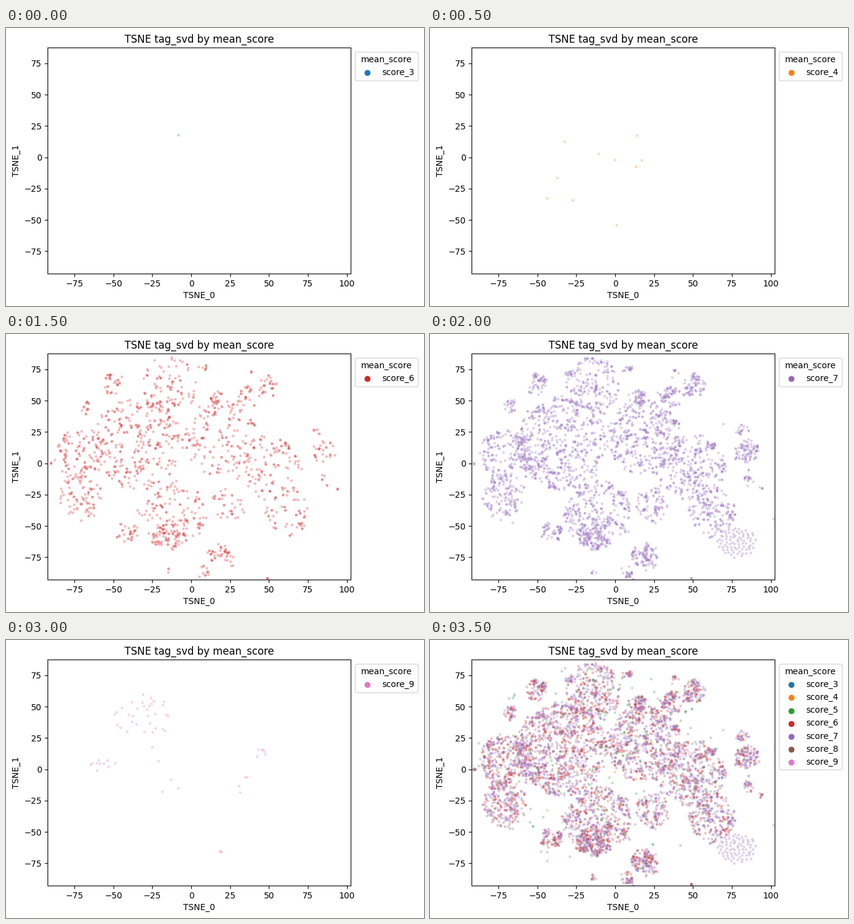
A matplotlib script that plays this animation: 684 by 455 pixels, repeating every 4500 ms.

```python
import matplotlib.pyplot as plt
import numpy as np
from matplotlib.animation import FuncAnimation

WIDTH, HEIGHT, DPI = 684, 455, 100
LEFT, BOTTOM, AX_W, AX_H = 68.4, 52.95, 496, 369.6
ORIGIN = np.array([303.05, 211.6])     # stage position of data (0, 0)
SCALE = np.array([2.546, -2.049])      # stage pixels per data unit
COLORS = ["#1f77b4", "#ff7f0e", "#2ca02c", "#d62728",
          "#9467bd", "#8c564b", "#e377c2"]
LABELS = [f"score_{n}" for n in range(3, 10)]

# Discs that outline the point cloud: x, y, radius
BODY = [(265, 83, 46), (215, 180, 75), (124, 195, 42), (122, 268, 38),
        (275, 295, 54), (350, 170, 62), (430, 220, 54), (463, 292, 38),
        (365, 280, 28)]
ISLANDS = [(174, 83, 17), (130, 120, 11), (338, 103, 15), (322, 57, 9),
           (398, 66, 6), (398, 103, 18), (432, 84, 19), (513, 157, 9),
           (519, 192, 20), (521, 240, 9), (542, 254, 4), (74, 211, 3),
           (200, 324, 17), (268, 328, 26), (322, 388, 11), (268, 388, 5),
           (352, 364, 23), (428, 399.5, 0.5)]


def disc(rng, x, y, rx, ry, n, spread=0.5):
    """Random points in an ellipse; spread 0.5 covers it evenly."""
    radius = rng.random(n) ** spread
    angle = rng.random(n) * 2 * np.pi
    return np.c_[x + rx * radius * np.cos(angle),
                 y + ry * radius * np.sin(angle)]


def with_doubles(rng, points, share):
    """Move some points almost onto a neighbour, which darkens it."""
    doubled = rng.random(len(points)) < share
    points[doubled] = np.roll(points, 1, axis=0)[doubled]
    return points + rng.normal(0, 0.3, points.shape)


def clumped(rng, hub_seed, x, y, r, n):
    """Disc of points, part of them gathered round hubs shared by scores."""
    points = disc(rng, x, y, r, r, n)
    hub_count = max(1, int(r * r / 60))
    hubs = disc(np.random.default_rng(hub_seed), x, y, r, r, hub_count)
    near_hubs = (hubs[rng.integers(hub_count, size=n)]
                 + rng.normal(0, min(2.8, r / 3), (n, 2)))
    gathered = rng.random(n) < 0.45
    return with_doubles(rng, np.where(gathered[:, None], near_hubs, points),
                        0.28)


def cloud(seed, body_rate, island_rate, tilt):
    """Whole cloud; a positive tilt makes its left side denser."""
    rng = np.random.default_rng(seed)
    areas = ([(area, body_rate) for area in BODY]
             + [(area, island_rate) for area in ISLANDS])
    parts = []
    for hub_seed, ((x, y, r), rate) in enumerate(areas):
        n = max(3, round(rate * r * r * (1 + tilt * (300 - x) / 300)))
        parts.append(clumped(rng, hub_seed, x, y, r, n))
    return np.vstack(parts)


def sunflower(x, y, rx, ry, n):
    """Evenly spaced ellipse of points."""
    k = np.arange(n)
    radius = np.sqrt((k + 0.5) / n)
    noise = np.random.default_rng(5).normal(0, 0.9, (n, 2))
    return np.c_[x + rx * radius * np.cos(2.4 * k),
                 y + ry * radius * np.sin(2.4 * k)] + noise


rng = np.random.default_rng(4)
scores = [
    np.array([(281.5, 175.5)]),
    disc(rng, 270, 235, 87, 105, 10),
    with_doubles(rng, disc(rng, 275, 210, 205, 175, 140, 0.65), 0.08),
    cloud(6, 0.052, 0.10, 0.4),
    np.vstack([cloud(7, 0.115, 0.22, -0.1), sunflower(502, 341, 32, 24, 75),
               [(562, 303), (82, 195), (480, 147.5)]]),
    cloud(8, 0.035, 0.07, 0),
    np.vstack([disc(rng, 227, 125, 50, 36, 32), disc(rng, 154, 205, 28, 9, 10),
               disc(rng, 417, 184, 10, 9, 6), disc(rng, 390, 240, 10, 18, 4),
               disc(rng, 351, 346, 2, 2, 3), disc(rng, 285, 205, 60, 60, 5)]),
]
offsets = [(points - ORIGIN) / SCALE for points in scores]
colors = [[color] * len(points) for color, points in zip(COLORS, scores)]

# The last view mixes every score in one shuffled layer.
order = np.random.default_rng(1).permutation(sum(map(len, scores)))
offsets.append(np.vstack(offsets)[order])
colors.append(np.concatenate(colors)[order])

fig = plt.figure(figsize=(WIDTH / DPI, HEIGHT / DPI), dpi=DPI)
ax = fig.add_axes([LEFT / WIDTH, BOTTOM / HEIGHT, AX_W / WIDTH, AX_H / HEIGHT])
dots = ax.scatter([], [], s=10, alpha=0.3, linewidths=0.25, edgecolors="white")
handles = [ax.scatter([], [], color=color, label=label, linewidths=1)
           for color, label in zip(COLORS, LABELS)]
ax.set_title("TSNE tag_svd by mean_score")
ax.set_xlabel("TSNE_0")
ax.set_ylabel("TSNE_1")
top = HEIGHT - BOTTOM - AX_H
ax.set_xlim((np.array([LEFT, LEFT + AX_W]) - ORIGIN[0]) / SCALE[0])
ax.set_ylim((np.array([top + AX_H, top]) - ORIGIN[1]) / SCALE[1])


def update(frame):
    view = min(frame, len(COLORS))
    dots.set_offsets(offsets[view])
    dots.set_facecolor(colors[view])
    shown = handles if view == len(COLORS) else [handles[view]]
    ax.legend(handles=shown, title="mean_score", loc="upper left",
              bbox_to_anchor=(1, 1))
    return [dots]


anim = FuncAnimation(fig, update, frames=9, interval=500, repeat=True,
                     repeat_delay=0, init_func=lambda: update(0))
plt.show()
```
